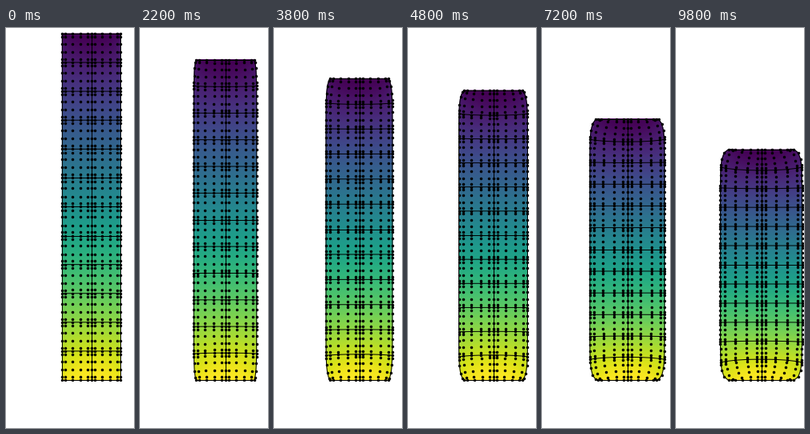
Write a matplotlib script that moves like this. It is 160 by 500 pixels and loops after 10 s.

```python
import numpy as np
import matplotlib.pyplot as plt
from matplotlib.animation import FuncAnimation
from matplotlib.collections import LineCollection

W, H, DPI = 160, 500, 100
FRAMES, INTERVAL = 50, 200
PX = 72 / DPI                      # one pixel in points
ORDER, COLS, ROWS = 5, 2, 12
MID, BASE, CLIP = 106.5, 440.0, 440.6
HALF, LENGTH, STEP = 36.4, 436.0, 2.96


def lobatto_grid(cells):
    """Gauss-Lobatto nodes of all cells, scaled to 0..1."""
    a, b = (np.sqrt((7 + s * 2 * np.sqrt(7)) / 21) for s in (1, -1))
    local = (np.array([-1, -a, -b, b, a]) + 1) / 2
    nodes = np.concatenate([k + local for k in range(cells)])
    return np.append(nodes, cells) / cells


X, Y = np.meshgrid(2 * lobatto_grid(COLS) - 1, lobatto_grid(ROWS) * LENGTH)


def hump(s, a):
    return s / a * np.exp(1 - s / a)


def deform(n):
    """Node positions of the bar squeezed between two rough plates."""
    press = STEP * (n + 1)
    load = (n + 1) / FRAMES
    end = np.minimum(Y, LENGTH - Y)
    side = np.sign(LENGTH / 2 - Y)
    inner = 1 - X ** 2

    bulge = 0.25 * n + 0.001 * n ** 2
    rise = 1 - np.exp(-(end / (11.5 + 10 * inner)) ** (1 + 0.4 * inner))
    x = MID + X * (HALF + bulge * rise)

    shift = 2.2 * inner * hump(end, 22) - 4.6 * X ** 4 * hump(end, 12)
    y = Y * (1 - press / LENGTH) + side * load * shift
    return x, BASE - y, y - Y


fig = plt.figure(figsize=(W / DPI, H / DPI), dpi=DPI, facecolor="white")
ax = fig.add_axes([0, 1 - CLIP / H, 1, CLIP / H])
ax.set_xlim(0, W)
ax.set_ylim(CLIP, 0)
ax.axis("off")

edges = LineCollection([], colors="black", linewidths=1.0 * PX, zorder=2)
ax.add_collection(edges, autolim=False)
dots, = ax.plot([], [], "o", color="black", ms=3.5 * PX, mew=0, zorder=3)
fill = []


def draw(n):
    x, y, drop = deform(n)
    while fill:
        fill.pop().remove()
    fill.append(ax.pcolormesh(x, y, drop, shading="gouraud",
                              cmap="viridis", zorder=1))
    ax.set_xlim(0, W)
    ax.set_ylim(CLIP, 0)
    pts = np.stack([x, y], axis=-1)
    edges.set_segments(list(pts[::ORDER])
                       + list(pts.transpose(1, 0, 2)[::ORDER]))
    dots.set_data(x.ravel(), y.ravel())
    return fill + [edges, dots]


anim = FuncAnimation(fig, draw, frames=FRAMES, interval=INTERVAL,
                     init_func=lambda: draw(0), repeat=True, repeat_delay=0)
plt.show()
```
